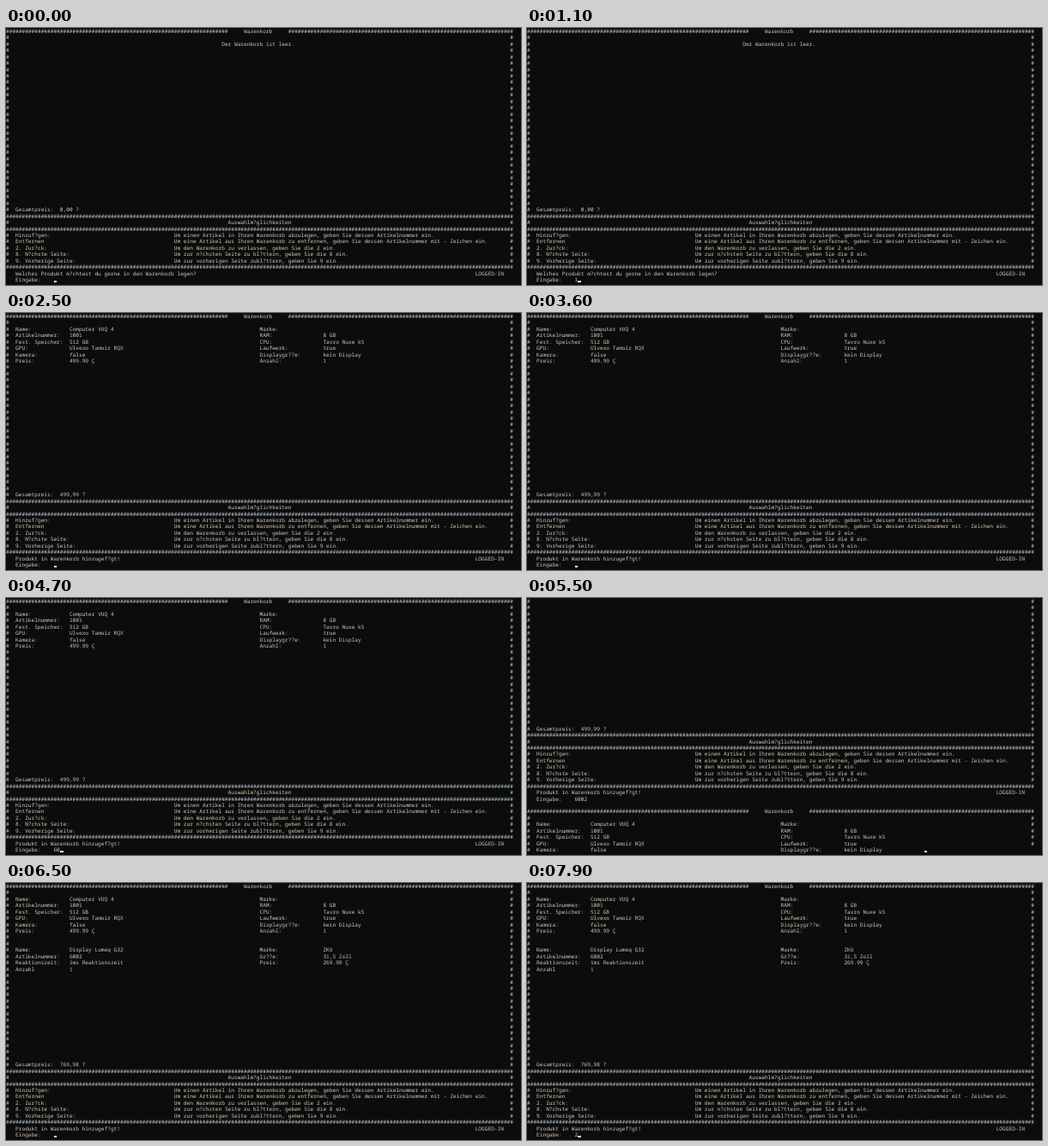
Animation, 600 px wide and 300 px high, one loop 8 s. Source, as an HTML page:

```html
<!DOCTYPE html>
<html lang="de">
<head>
<meta charset="utf-8">
<title>Warenkorb</title>
<style>
html, body { margin: 0; width: 100%; height: 100%; overflow: hidden; background: #0c0c0c; }
#term {
  position: absolute; left: 0; top: 0; width: 600px; height: 300px; overflow: hidden;
  font: 6.1667px/7.436px "Noto Sans Mono", "DejaVu Sans Mono", monospace;
  color: #d2cabb; white-space: pre; text-rendering: geometricPrecision;
  font-variant-ligatures: none;
}
.row { position: absolute; left: 0; height: 7.436px; }
.row i { font-style: normal; color: #b9c8d0; }
#cursor { position: absolute; top: 295px; width: 3.7px; height: 2px; background: #f2f2f2; }
</style>
</head>
<body>
<div id="term"><div id="cursor"></div></div>
<script>
const COLS = 160, ROWS = 40, CELL_W = 3.7, CELL_H = 7.436;
const LOOP = 8000, STEP = 100, BLINK = 530;
const ROWS_PER_MS = 0.06;
const INPUT_COL = 15;

// Places [column, text] pairs on one line.
const line = (...parts) =>
  parts.reduce((s, [col, text]) => s.padEnd(col) + text, '');
const boxed = (...parts) => line([0, '#'], ...parts, [COLS - 1, '#']);
const bar = '#'.repeat(COLS);

const options = [
  ['Hinzuf?gen:', 'Um einen Artikel in Ihren Warenkorb abzulegen, geben Sie dessen Artikelnummer ein.'],
  ['Entfernen', 'Um eine Artikel aus Ihren Warenkorb zu entfernen, geben Sie dessen Artikelnummer mit - Zeichen ein.'],
  ['2. Zur?ck:', 'Um den Warenkorb zu verlassen, geben Sie die 2 ein.'],
  ['8. N?chste Seite:', 'Um zur n?chsten Seite zu bl?ttern, geben Sie die 8 ein.'],
  ['9. Vorherige Seite:', 'Um zur vorherigen Seite zubl?ttern, geben Sie 9 ein.']
];

const details = rows => rows.map(([a, b, c, d]) =>
  c ? boxed([3, a], [20, b], [80, c], [100, d]) : boxed([3, a], [20, b]));

const computer = details([
  ['Name:', 'Computer VUQ 4', 'Marke:', ''],
  ['Artikelnummer:', '1001', 'RAM:', '8 GB'],
  ['Fest. Speicher:', '512 GB', 'CPU:', 'Tavro Nuxe k5'],
  ['GPU:', 'Ulvexo Tamoir RQX', 'Laufwerk:', 'true'],
  ['Kamera:', 'false', 'Displaygr??e:', 'kein Display'],
  ['Preis:', '499.99 Ç', 'Anzahl:', '1']
]);

const display = details([
  ['Name:', 'Display Lumeq G32', 'Marke:', 'ZKU'],
  ['Artikelnummer:', '6002', 'Gr??e:', '31,5 Zoll'],
  ['Reaktionszeit:', '1ms Reaktionszeit', 'Preis:', '269.99 Ç'],
  ['Anzahl', '1']
]);

function screen(items, total, message) {
  const body = [boxed(), ...items];
  while (body.length < 27) body.push(boxed());
  return [
    line([0, '#'.repeat(70)], [75, 'Warenkorb'], [89, '#'.repeat(71)]),
    ...body,
    boxed([3, 'Gesamtpreis:  ' + total + ' ?']),
    bar,
    boxed([70, 'Auswahlm?glichkeiten']),
    bar,
    ...options.map(([key, help]) => boxed([3, key], [53, help])),
    bar,
    line([3, message], [148, 'LOGGED-IN']),
    line([3, 'Eingabe:'])
  ];
}

const added = 'Produkt in Warenkorb hinzugef?gt!';
const pages = [
  { from: -LOOP, input: '1001', keys: [1000, 1200, 1300, 1500],
    lines: screen([boxed([68, 'Der Warenkorb ist leer.'])], '0,00',
      'Welches Produkt m?chtest du gerne in den Warenkorb legen?') },
  { from: 1700, input: '6002', keys: [4500, 4700, 4800, 5000],
    lines: screen(computer, '499,99', added) },
  { from: 5353.6, input: '2', keys: [7800],
    lines: screen([...computer, boxed(), boxed(), ...display], '769,98', added) }
];

const withInput = (lines, text) =>
  [...lines.slice(0, -1), line([0, lines[ROWS - 1]], [INPUT_COL, text])];

function view(t) {
  const n = pages.findLastIndex(p => t >= p.from);
  const page = pages[n];
  const pos = Math.max(ROWS, ROWS - 1 + (t - page.from) * ROWS_PER_MS);

  if (n > 0 && pos < 2 * ROWS + 1) {
    // The next page is printed on the bottom line and pushes the old one up.
    const prev = pages[n - 1];
    const all = [...withInput(prev.lines, prev.input), '', ...page.lines];
    const row = Math.floor(pos), col = Math.floor((pos - row) * COLS);
    return {
      lines: [...all.slice(row - ROWS + 1, row), all[row].slice(0, col)],
      col, lit: true
    };
  }
  const typed = page.input.slice(0, page.keys.filter(k => t >= k).length);
  return {
    lines: withInput(page.lines, typed),
    col: INPUT_COL + typed.length,
    lit: Math.floor(t / BLINK) % 2 === 0
  };
}

const term = document.getElementById('term');
const cursor = document.getElementById('cursor');
const rows = Array.from({ length: ROWS }, (_, i) => {
  const el = document.createElement('div');
  el.className = 'row';
  el.style.top = i * CELL_H + 'px';
  term.insertBefore(el, cursor);
  return el;
});

let shown = -1;
function draw() {
  const t = Math.floor((performance.now() % LOOP) / STEP + 0.02) * STEP % LOOP;
  if (t !== shown) {
    shown = t;
    const { lines, col, lit } = view(t);
    rows.forEach((el, i) => { el.innerHTML = lines[i].replace(/#+/g, '<i>$&</i>'); });
    cursor.style.left = col * CELL_W + 'px';
    cursor.style.visibility = lit ? 'visible' : 'hidden';
  }
  requestAnimationFrame(draw);
}
draw();
</script>
</body>
</html>
```
